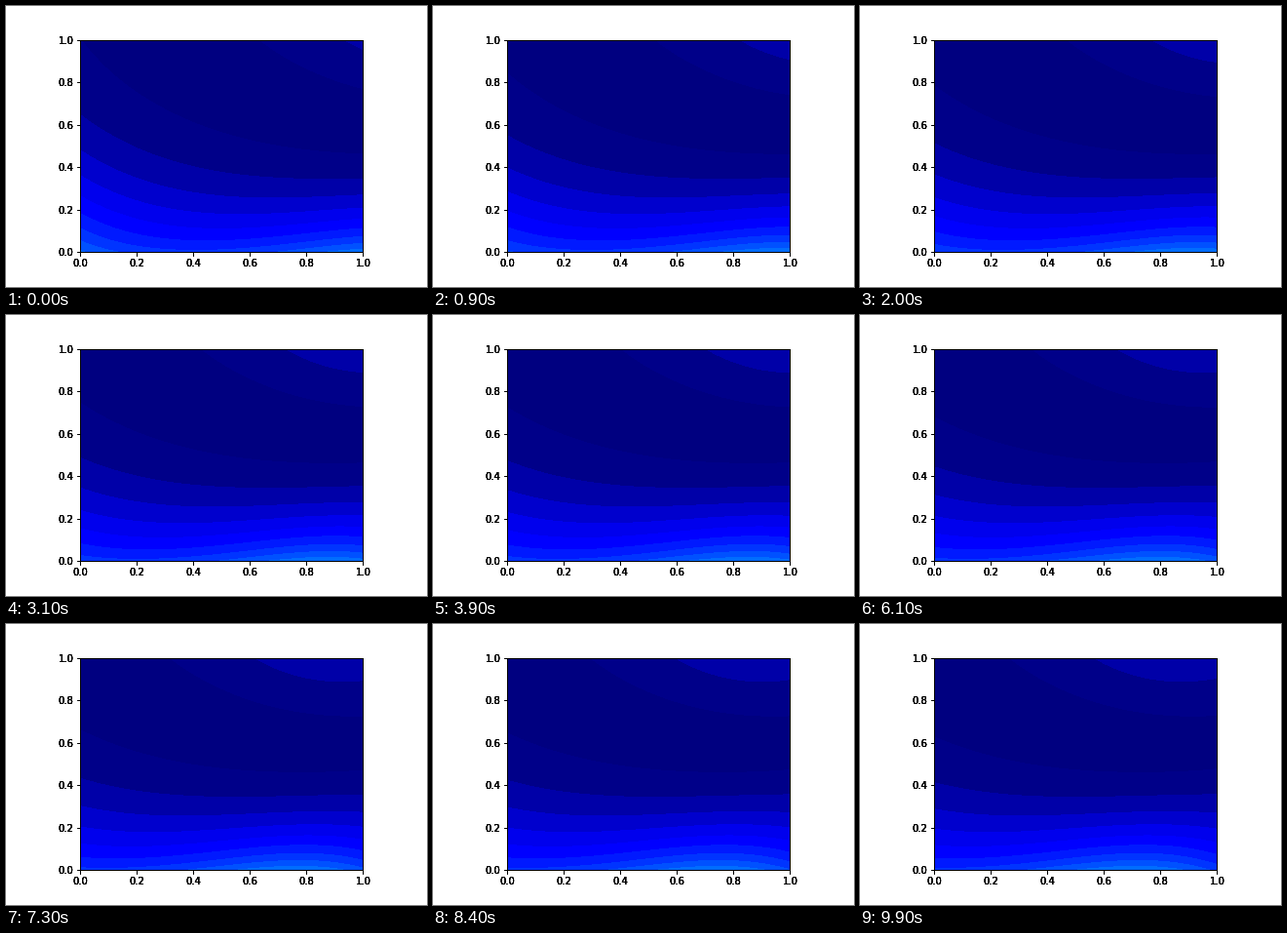
A matplotlib script that plays this animation: 432 by 288 pixels, repeating every 10000 ms.

```python
import numpy as np
import matplotlib.pyplot as plt
from matplotlib.animation import FuncAnimation

FRAMES = 100
LEVELS = np.arange(17)
COLORS = plt.get_cmap("jet")(np.clip((LEVELS[:-1] - .58) * .0275, 0, 1))

# Valley centre and its distance to the fourth contour, as cubics in x
KNOTS = [0, .5, 1, 1.37]
CENTRE = np.polyfit(KNOTS, [.95, .67, .539, .532], 3)
REACH = np.polyfit(KNOTS, [.61, .497, .338, .345], 3)

X, Y = np.meshgrid(np.linspace(0, 1, 60), np.linspace(0, 1, 120))
# Height stretched near the floor and squeezed near the top
W = Y - .1 * Y**2 - .13 * Y**3 - .03 * np.exp(-Y / .05)

plt.rcParams.update({"font.family": "DejaVu Sans", "font.size": 10})
fig = plt.figure(figsize=(6, 4), dpi=72)
fig.subplots_adjust(left=.125, right=.9, bottom=.125, top=.88)

# Stacked frames harden the soft edges of labels and lines
axes = [fig.add_subplot(xlim=(0, 1), ylim=(0, 1), aspect=.75,
                        facecolor="none") for _ in range(5)]
bands = None


def field(t):
    x = X + .37 * np.sqrt(t)
    floor = .72 - .17 * x
    power = 2 - .15 * x**4
    dist = np.abs(W - np.polyval(CENTRE, x)) / np.polyval(REACH, x)
    return floor + (4 - floor) * dist**power


def update(i):
    global bands
    if bands is not None:
        bands.remove()
    bands = axes[0].contourf(X, Y, field(i / (FRAMES - 1)),
                             levels=LEVELS, colors=COLORS)
    return [bands]


anim = FuncAnimation(fig, update, frames=FRAMES, init_func=lambda: [],
                     interval=100, repeat=True, repeat_delay=0)
plt.show()
```
